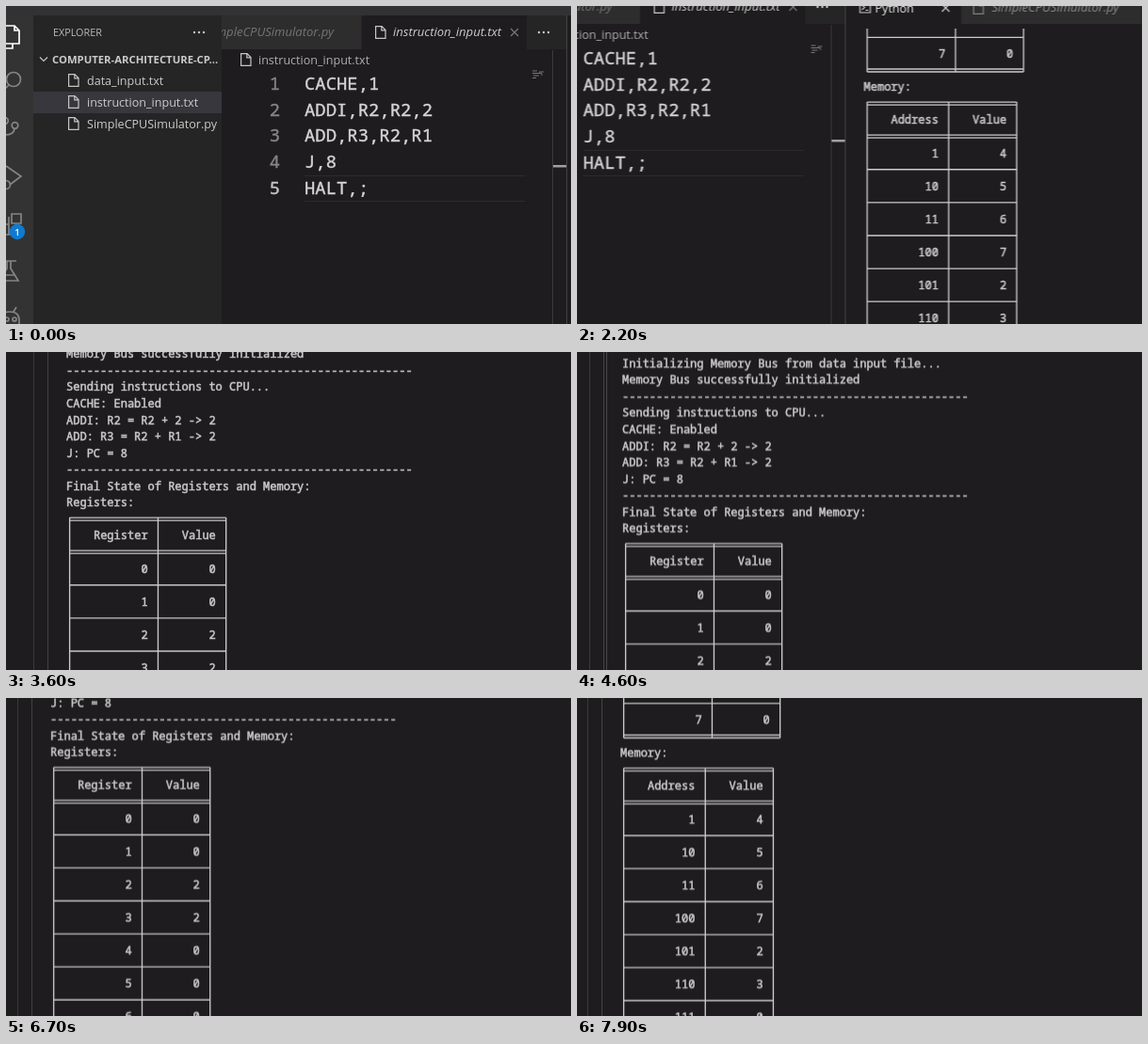
An HTML page that plays this animation: 600 px wide and 338 px high, repeating every 8000 ms.

```html
<!DOCTYPE html>
<html lang="en">
<head>
<meta charset="utf-8">
<title>CPU simulator walkthrough</title>
<style>
html, body { margin: 0; width: 100%; height: 100%; overflow: hidden; background: #1e1c1e; }
svg { display: block; width: 600px; height: 338px; }
text { font: 12.55px "Open Sans", "Noto Sans", sans-serif; fill: #ccc; }
.it { font-style: italic; font-size: 13.05px; }
.dim { fill: #757575; }
.head { font-size: 10.8px; fill: #bbb; }
.root { font-size: 11.3px; font-weight: 700; }
.code text { font: 18.9px "Noto Sans Mono", "DejaVu Sans Mono", monospace; fill: #d4d4d4; stroke: #d4d4d4; stroke-width: .4; }
.code .num { fill: #858585; stroke: #858585; text-anchor: end; }
.code .now { fill: #c6c6c6; stroke: #c6c6c6; }
#term text { font: 12.03px "Noto Sans Mono", "DejaVu Sans Mono", monospace; fill: #ccc; stroke: #ccc; stroke-width: .5; }
#term .end { text-anchor: end; }
#term path { stroke: #ccc; stroke-width: 1.35; fill: none; }
.icons, .line { fill: none; stroke: #858585; stroke-width: 1.7; }
.line { stroke: #c5c5c5; stroke-width: 1.2; }

#pan, #page, #term, #beam, #edge { animation: 8s linear infinite; }
#pan { animation-name: pan; }
#page { animation-name: page; }
#term { animation-name: scroll; }
#beam { animation-name: beam; }
#edge { animation-name: edge; }

@keyframes pan {
  0% { transform: translateX(0); }
  12.5% { transform: translateX(0); animation-timing-function: cubic-bezier(.5,0,.8,.6); }
  27.5% { transform: translateX(-310px); animation-timing-function: cubic-bezier(.4,.52,.6,1); }
  35%, 45% { transform: translateX(-551px); animation-timing-function: ease-in-out; }
  52.5%, 78.2% { transform: translateX(-567px); }
  90%, 100% { transform: translateX(-569px); }
}
@keyframes page {
  0% { transform: translateY(0); }
  12.5% { transform: translateY(0); animation-timing-function: cubic-bezier(.5,0,.8,.6); }
  27.5%, 30% { transform: translateY(-27px); animation-timing-function: ease-in-out; }
  40%, 100% { transform: translateY(-215px); }
}
@keyframes scroll {
  0% { transform: translate(615px, -413.5px); }
  12.5% { transform: translate(615px, -413.5px); animation-timing-function: cubic-bezier(.5,0,.8,.6); }
  27.5%, 30% { transform: translate(615px, -440.5px); animation-timing-function: ease-in-out; }
  43.75%, 45% { transform: translate(615px, -15.6px); animation-timing-function: ease-in-out; }
  52.5%, 78.2% { transform: translate(615px, 12px); }
  100% { transform: translate(615px, -497px); }
}
@keyframes beam {
  0%, 62.5% { transform: translate(610px, 300px); animation-timing-function: ease-out; }
  72.5%, 78.2% { transform: translate(145px, 137px); opacity: 1; }
  78.3%, 100% { transform: translate(145px, 137px); opacity: 0; }
}
@keyframes edge {
  0%, 48% { opacity: 0; }
  52.5%, 78.2% { opacity: 1; }
  84%, 100% { opacity: 0; }
}
</style>
</head>
<body>
<svg viewBox="0 0 600 338">
  <defs>
    <path id="file" class="line" d="M.6.6h6.4l4 4v8.8H.6zM6.8.8v4h4"/>
    <path id="close" d="M0 0l8 8M8 0l-8 8" stroke-width="1.2"/>
    <g id="dots" fill="#c5c5c5"><circle r="1.2"/><circle cx="5" r="1.2"/><circle cx="10" r="1.2"/></g>
  </defs>
  <rect width="600" height="338" fill="#1e1c1e"/>

  <g id="pan">
    <g id="term"></g>

    <g id="page">
      <rect width="595" height="800" fill="#1e1c1e"/>
      <!-- tab strip -->
      <rect x="595" y="46" width="700" height="5" fill="#1e1c1e"/>
      <rect x="229" y="10" width="1066" height="36" fill="#252526"/>
      <rect x="229" y="10" width="148" height="36" fill="#2d2d2d"/>
      <rect x="378" y="10" width="175" height="36" fill="#1e1c1e"/>
      <rect x="596" y="10" width="122" height="36" fill="#1e1c1e"/>
      <rect x="719" y="10" width="190" height="36" fill="#2d2d2d"/>
      <text class="it dim" x="348" y="32" text-anchor="end">SimpleCPUSimulator.py</text>
      <use href="#file" x="392" y="21"/>
      <text class="it" x="411" y="32">instruction_input.txt</text>
      <use href="#close" x="536" y="24" stroke="#777"/>
      <use href="#dots" x="566" y="28"/>
      <path class="line" d="M611 23h11v11h-11zM613 26l3 2.5l-3 2.5M617 31.5h3"/>
      <text x="627" y="33.5" style="font-weight:500;fill:#eee">Python</text>
      <use href="#close" x="698" y="25" stroke="#ccc"/>
      <use href="#file" x="731" y="22" opacity=".55"/>
      <text class="it" x="751" y="33" style="fill:#8c8c8c">SimpleCPUSimulator.py</text>

      <!-- editor -->
      <use href="#file" x="249" y="50"/>
      <text x="268" y="61.5" style="fill:#b0b0b0">instruction_input.txt</text>
      <path d="M317 180.5h234M317 207.5h234" stroke="#2c2c2c"/>
      <g id="code" class="code"></g>
      <path d="M559 69h5M566 70h5M559 71.5h10M560 74h6M568 73h2M559 76.5h4" stroke="#777" stroke-width="1.2"/>
      <path d="M580.5 47v753" stroke="#3b3b39"/>
      <path d="M595.5 10v790" stroke="#444"/>
      <path id="edge" d="M598.5 47v753" stroke="#484848"/>
      <rect x="581" y="169" width="14" height="2.5" fill="#a0a0a0"/>

      <!-- explorer -->
      <rect x="29" y="10" width="200" height="790" fill="#252526"/>
      <rect x="29" y="91" width="200" height="23" fill="#37373d"/>
      <text class="head" x="50" y="31.5">EXPLORER</text>
      <use href="#dots" x="200" y="28"/>
      <path class="line" d="M36 54.5l4 4l4-4"/>
      <text class="root" x="49" y="60.5">COMPUTER-ARCHITECTURE-CP...</text>
      <g id="files"></g>

      <!-- activity bar -->
      <rect y="10" width="29" height="790" fill="#333"/>
      <g class="icons">
        <path d="M-6 21h15l5 5v14h-15M9 21v5h5M7 40v5h-15" stroke="#fff"/>
        <circle cx="8" cy="78" r="7.5"/><path d="M3 84l-8 8"/>
        <circle cx="9.5" cy="127" r="3.3"/><circle cx="-1" cy="122" r="3.3"/>
        <path d="M9 131q-1 6-10 6M-1 126v14"/>
        <path d="M0 170l16 11l-12 9"/><circle cx="0" cy="190" r="4.5"/>
        <path d="M6 221h10v10h-10zM-6 232h9v11h-9M3 232v-8M3 243h9v-8"/>
        <path d="M-2 271h13M1 271v8l-8 13h20l-8-13v-8M-3 286h13"/>
        <path d="M-8 342v-9q0-8 12-8q10 0 10 9v9M8 325l3-5"/>
        <circle cx="1" cy="333" r="2"/><circle cx="9" cy="333" r="2"/>
      </g>
      <circle cx="12" cy="240" r="8.2" fill="#0f7ad0"/>
      <text x="12" y="243.5" text-anchor="middle" style="font-size:9.5px;font-weight:600;fill:#fff">1</text>

      <rect width="1295" height="10" fill="#323234"/>
    </g>
  </g>

  <g id="beam">
    <path d="M-4-8.5q3 0 4 1.500q1-1.500 4-1.500M0-7.500v15M-4 8.500q3 0 4-1.500q1 1.500 4 1.500" fill="none" stroke="#ddd" stroke-width="1.3"/>
  </g>
</svg>

<script>
const NS = "http://www.w3.org/2000/svg";
const byId = id => document.getElementById(id);

function add(parent, tag, attrs, content = "") {
  const el = document.createElementNS(NS, tag);
  for (const key in attrs) el.setAttribute(key, attrs[key]);
  el.textContent = content;
  return parent.appendChild(el);
}

["data_input.txt", "instruction_input.txt", "SimpleCPUSimulator.py"].forEach((name, i) => {
  const y = 79 + 23 * i;
  add(byId("files"), "use", { href: "#file", x: 66, y: y - 7 });
  add(byId("files"), "text", { x: 86, y: y + 4.5 }, name);
});

["CACHE,1", "ADDI,R2,R2,2", "ADD,R3,R2,R1", "J,8", "HALT,;"].forEach((src, i) => {
  const y = 88.7 + 27.8 * i;
  add(byId("code"), "text", { x: 291, y, class: i === 4 ? "num now" : "num" }, i + 1);
  add(byId("code"), "text", { x: 317, y }, src);
});

// Terminal output on a character grid
const term = byId("term"), CHAR = 7.22, LINE = 17.55;
const colX = col => (col + 0.5) * CHAR;

function print(line, str, endCol) {
  const x = endCol ? endCol * CHAR : 0;
  add(term, "text", { x, y: line * LINE + 4.3, class: endCol ? "end" : "" }, str);
}

function table(line, split, right, rows) {
  const last = rows.length, top = line * LINE, bottom = (line + 2 * last) * LINE;
  let d = "";
  for (const col of [0, split, right]) d += `M${colX(col)} ${top - 1.5}V${bottom + 1.5}`;
  for (let i = 0; i <= last; i++) {
    const y = (line + 2 * i) * LINE;
    const double = i < 2 || i === last;
    for (const dy of double ? [-1.5, 1.5] : [0]) d += `M${colX(0)} ${y + dy}H${colX(right)}`;
  }
  add(term, "path", { d });
  rows.forEach(([key, value], i) => {
    print(line + 2 * i + 1, key, split - 1);
    print(line + 2 * i + 1, value, right - 1);
  });
}

const rule = "-".repeat(51);
[
  "Initializing Memory Bus from data input file...",
  "Memory Bus successfully initialized",
  rule,
  "Sending instructions to CPU...",
  "CACHE: Enabled",
  "ADDI: R2 = R2 + 2 -> 2",
  "ADD: R3 = R2 + R1 -> 2",
  "J: PC = 8",
  rule,
  "Final State of Registers and Memory:",
  "Registers:"
].forEach((str, i) => print(i, str));

const registers = [0, 0, 2, 2, 0, 0, 0, 0].map((value, i) => [i, value]);
table(11, 13, 23, [["Register", "Value"], ...registers]);

print(30, "Memory:");
const memory = [4, 5, 6, 7, 2, 3, 0].map((value, i) => [(i + 1).toString(2), value]);
table(31, 12, 22, [["Address", "Value"], ...memory]);
</script>
</body>
</html>
```
